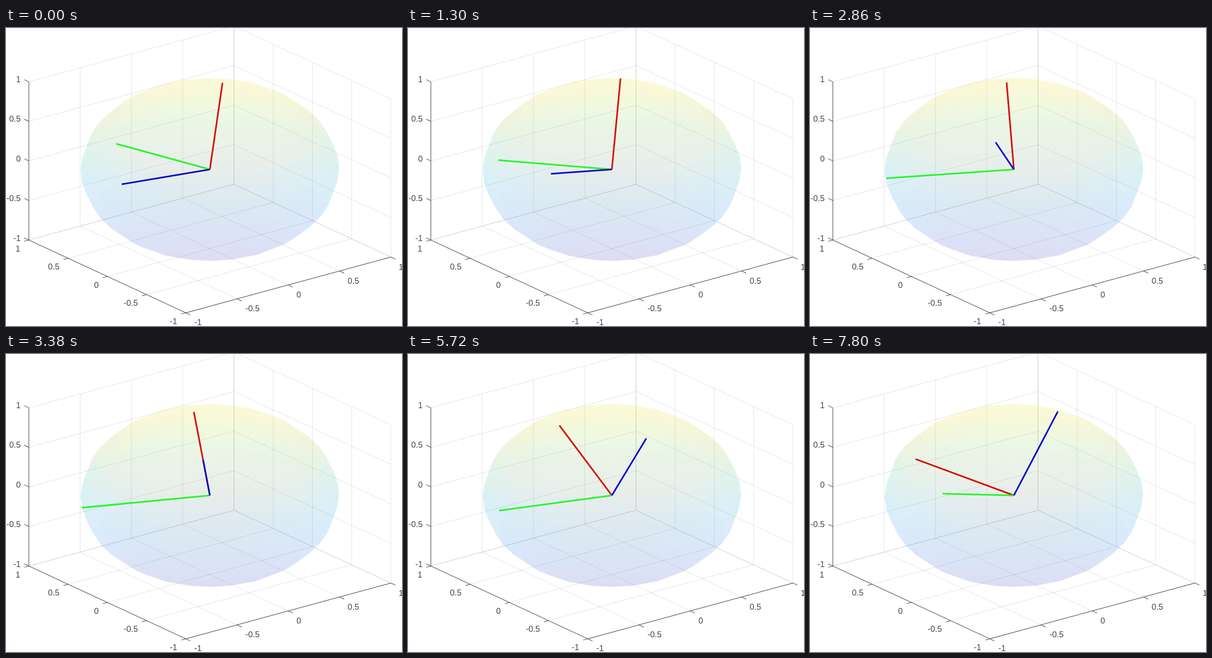
These frames come from a looping animation (863 by 649 pixels, 8000 ms). An HTML page:

```html
<!DOCTYPE html>
<html lang="en">
<head>
<meta charset="utf-8">
<title>Rotating axes in a sphere</title>
<style>
  html, body { margin: 0; width: 100%; height: 100%; overflow: hidden; background: #fff; }
  svg { display: block; width: 863px; height: 649px; }
  text { font: 18px "Liberation Sans", Arial, sans-serif; fill: #464646; }
  .grid { stroke: #262626; stroke-opacity: .14; }
  .axis { stroke: #262626; stroke-opacity: .8; stroke-width: 1.2; }
  .face { stroke-width: .7; stroke-linejoin: round; }
  .arm { stroke-width: 3.5; }
</style>
</head>
<body>
<svg id="plot" viewBox="0 0 863 649"></svg>
<script>
const svg = document.getElementById('plot');
const CX = 444.3, CY = 308, RX = 281.4, RY = 199.3;
const { sin, cos, PI } = Math;

function add(tag, attrs, parent = svg) {
  const el = document.createElementNS('http://www.w3.org/2000/svg', tag);
  for (const k in attrs) el.setAttribute(k, attrs[k]);
  parent.appendChild(el);
  return el;
}

const project = ([x, y, z]) => [
  CX + 223.5 * x - 171 * y,
  CY - 60.75 * x - 79.25 * y - 172.3 * z
];

function seg(cls, [x1, y1], [x2, y2]) {
  return add('line', { class: cls, x1, y1, x2, y2 });
}
const line3 = (cls, a, b) => seg(cls, project(a), project(b));

// Grid on the floor and the two back walls
const ticks = [-1, -0.5, 0, 0.5, 1];
for (const v of ticks) {
  line3('grid', [v, -1, -1], [v, 1, -1]);
  line3('grid', [-1, v, -1], [1, v, -1]);
  line3('grid', [v, 1, -1], [v, 1, 1]);
  line3('grid', [-1, 1, v], [1, 1, v]);
  line3('grid', [1, v, -1], [1, v, 1]);
  line3('grid', [1, -1, v], [1, 1, v]);
}

// Sphere: faces coloured by height, back and front halves blended separately
const palette = [[62, 38, 168], [46, 135, 247], [37, 190, 190], [209, 191, 39], [249, 251, 21]];
function heightColor(z) {
  const p = (z + 1) / 2 * (palette.length - 1);
  const i = Math.min(Math.floor(p), palette.length - 2);
  const mix = palette[i].map((c, k) => Math.round(c + (palette[i + 1][k] - c) * (p - i)));
  return `rgb(${mix})`;
}

const N = 20;
const viewer = [-0.523, -0.687, 0.506];
function onSphere(i, j) {
  const lat = PI * (i / N - 0.5), lon = PI * (2 * j / N - 1);
  return [cos(lat) * cos(lon), cos(lat) * sin(lon), sin(lat)];
}
const back = add('g', { opacity: 0.085 });
const front = add('g', { opacity: 0.085 });
for (let i = 0; i < N; i++) {
  const color = heightColor(onSphere(i, 0)[2]);
  for (let j = 0; j < N; j++) {
    const mid = onSphere(i + 0.5, j + 0.5);
    const facing = mid.reduce((s, c, k) => s + c * viewer[k], 0) > 0;
    const quad = [[i, j], [i, j + 1], [i + 1, j + 1], [i + 1, j]];
    const points = quad.map(([a, b]) => project(onSphere(a, b)).map(n => n.toFixed(2))).join(' ');
    add('polygon', { class: 'face', points, fill: color, stroke: color }, facing ? front : back);
  }
}

// Axes, ticks and labels
line3('axis', [-1, 1, -1], [-1, 1, 1]);
line3('axis', [-1, -1, -1], [-1, 1, -1]);
line3('axis', [-1, -1, -1], [1, -1, -1]);

function tick(at, dx, dy) {
  const [x, y] = project(at);
  seg('axis', [x, y], [x + dx, y + dy]);
}
function label(v, x, y, anchor) {
  add('text', { x, y: y + 6.8, 'text-anchor': anchor }).textContent = v;
}
ticks.forEach((v, i) => {
  tick([-1, 1, v], -10, -4.7);
  tick([-1, v, -1], -10, 2.7);
  tick([v, -1, -1], 10, 4.7);
  label(v, 32, 457 - 86.5 * i, 'end');
  label(v, 373 - 85.5 * i, 638 - 39.5 * i, 'end');
  label(v, 410.5 + 111.3 * i, 640.5 - 30.2 * i, 'start');
});

// Key turns of the rigid frame: step, yaw and roll in degrees
const STEP = 260, LOOP = 8000, LAST = 30;
const turns = [[0, -41, -9.7], [3, -34.2, -8.2], [8, -17.6, 7.2], [13, 0, 22.9],
  [17, 10.3, 26.3], [22, 27.6, 39.2], [LAST, 56.5, 66.6]];

// Smooth curve through column c of the turns
function curve(c, t) {
  const last = turns.length - 1;
  const slope = (a, b) => (turns[b][c] - turns[a][c]) / (turns[b][0] - turns[a][0]);
  const tangent = i => slope(Math.max(i - 1, 0), Math.min(i + 1, last));
  let i = 0;
  while (i < last - 1 && t >= turns[i + 1][0]) i++;
  const h = turns[i + 1][0] - turns[i][0], s = (t - turns[i][0]) / h, r = 1 - s;
  return r * r * (1 + 2 * s) * turns[i][c] + s * s * (3 - 2 * s) * turns[i + 1][c]
    + h * s * r * (r * tangent(i) - s * tangent(i + 1));
}

// Right and up parts of the three perpendicular unit arms
function frameAt(step) {
  const rad = PI / 180, yawDeg = curve(1, step);
  const yaw = yawDeg * rad, roll = curve(2, step) * rad;
  const pitch = (0.0076 * (yawDeg - 18) ** 2 - 10.2) * rad;
  const up = [sin(pitch) * cos(yaw), cos(pitch)];
  const side = [sin(yaw), 0];
  const blend = (a, b) => up.map((n, k) => n * a + side[k] * b);
  return [
    blend(cos(roll), -sin(roll)),
    [-cos(pitch) * cos(yaw), sin(pitch)],
    blend(sin(roll), cos(roll))
  ];
}

const arms = ['#d8100a', '#26f726', '#0d0bc8'].map(stroke =>
  add('line', { class: 'arm', stroke, x1: CX, y1: CY }));

function draw() {
  const step = Math.min(LAST, Math.floor(performance.now() % LOOP / STEP));
  frameAt(step).forEach(([right, up], i) => {
    arms[i].setAttribute('x2', CX + RX * right);
    arms[i].setAttribute('y2', CY - RY * up);
  });
  requestAnimationFrame(draw);
}
draw();
</script>
</body>
</html>
```
